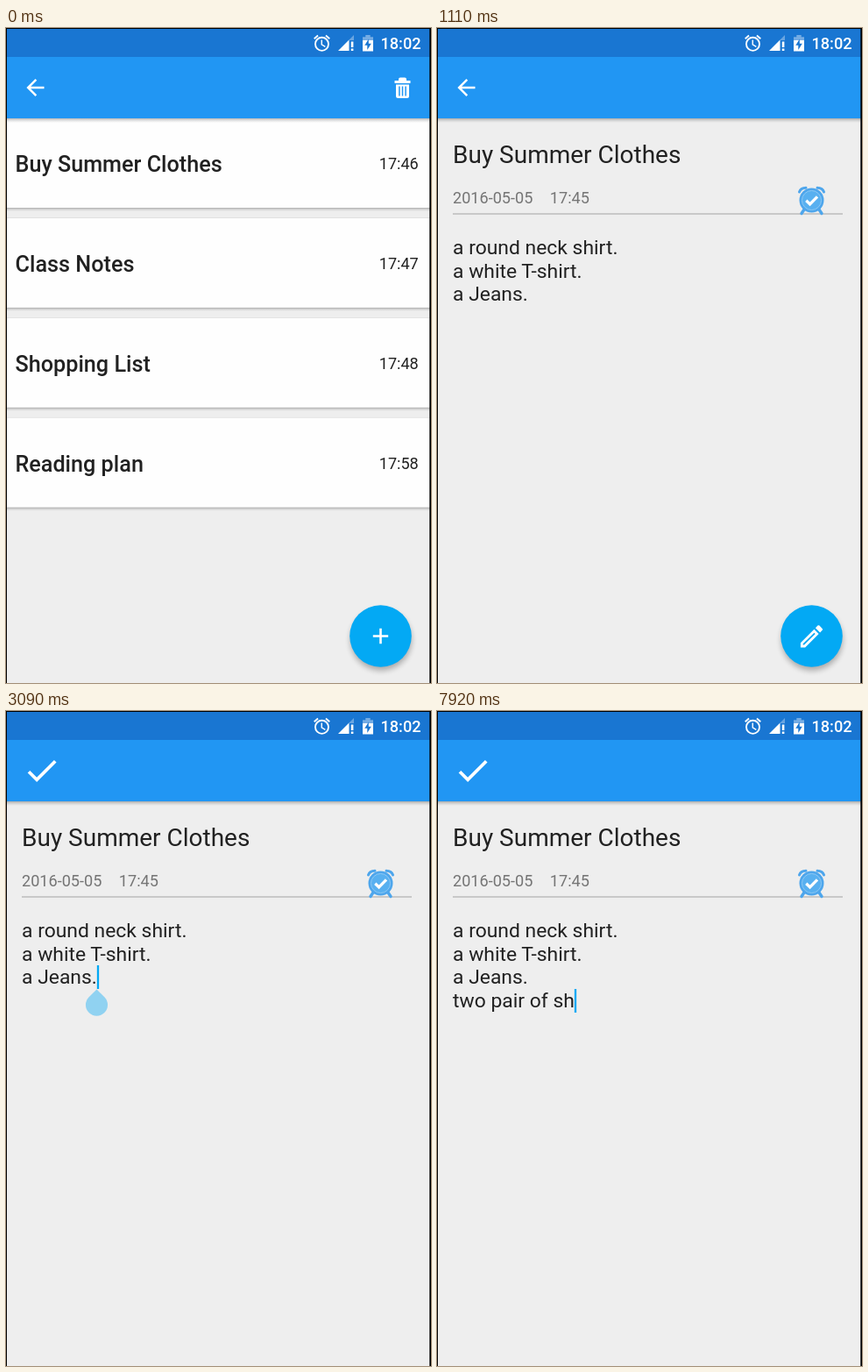
Animation of 485 by 747 pixels, one loop 8 s. Source, as an HTML page:

```html
<!DOCTYPE html>
<html lang="en">
<head>
<meta charset="utf-8">
<title>Notes</title>
<style>
  html, body { margin: 0; width: 100%; height: 100%; overflow: hidden; background: #000; }
  svg { display: block; width: 485px; height: 747px; }
  text { font-family: Roboto, sans-serif; fill: #212121; white-space: pre; }
  .item { font-size: 25.2px; font-weight: 500; }
  .small { font-size: 18.1px; }
  .grey { fill: #757575; }
  .title { font-size: 28px; }
  .body { font-size: 22.9px; }
  .clock { font-size: 18.2px; font-weight: 500; fill: #fff; }
</style>
</head>
<body>
<svg id="stage" viewBox="0 0 485 747" xmlns="http://www.w3.org/2000/svg"></svg>
<script>
const LOOP = 8000, STEP = 30;
const LEFT = 18, LINE = 26.5, BASE = 258, BLINK = 450;
const lines = ['a round neck shirt.', 'a white T-shirt.', 'a Jeans.'];
const typed = 'two pair of sh';
const keyTimes = [4470, 4800, 4890, 5370, 5640, 5760, 6150, 6330, 6660, 7200, 7290, 7500, 7830, 7920];
const items = [['Buy Summer Clothes', '17:46'], ['Class Notes', '17:47'],
               ['Shopping List', '17:48'], ['Reading plan', '17:58']];

const text = (x, y, cls, str, extra = '') => `<text x="${x}" y="${y}" class="${cls}" ${extra}>${str}</text>`;
const rect = (x, y, w, h, fill, extra = '') =>
  `<rect x="${x}" y="${y}" width="${w}" height="${h}" fill="${fill}" ${extra}/>`;
const icon = (x, y, scale, d) => `<path transform="translate(${x} ${y}) scale(${scale})" fill="#fff" d="${d}"/>`;

const backArrow = icon(18.4, 53, 1.255, 'M20 11H7.83l5.59-5.59L12 4l-8 8 8 8 1.41-1.41L7.83 13H20z');
const checkMark = icon(18.3, 45.5, 1.87, 'M9 16.17L4.83 12l-1.42 1.41L9 19 21 7l-1.41-1.41z');
const plus = '<path d="M418.8 693.5H436.2M427.5 684.8V702.2" stroke="#fff" stroke-width="2.6"/>';
const pencil = icon(410.7, 677, 1.4, 'M14.06 9.02l.92.92L5.92 19H5v-.92l9.06-9.06M17.66 3c-.25 0-.51.1-.7.29l-1.83 1.83 3.75 3.75 1.83-1.83c.39-.39.39-1.02 0-1.41l-2.34-2.34c-.2-.2-.45-.29-.71-.29zm-3.6 3.19L3 17.25V21h3.75L17.81 9.94l-3.75-3.75z');
const trash = `<g fill="#fff"><path d="M448 60V58.5Q448 56.5 450 56.5H455Q457 56.5 457 58.5V60H461.5V63H443.5V60Z"/>
  <path d="M445 64.5H460V77.5Q460 80 457.5 80H447.5Q445 80 445 77.5Z"/></g>
  <path d="M448.9 66.5V77.5M452.5 66.5V77.5M456.1 66.5V77.5" stroke="#2196f3" stroke-width="1.5"/>`;

const screen = (content, action) => rect(0, 0, 485, 800, '#eee') + content +
  rect(0, 103, 485, 5, 'url(#shade)') + rect(0, 0, 485, 33, '#1976d2') + rect(0, 33, 485, 70, '#2196f3') + action;

const fab = glyph => `<circle cx="428" cy="698" r="35" opacity=".28" filter="url(#blur)"/>
  <circle cx="427.5" cy="693.5" r="35.3" fill="#03a9f4"/>${glyph}`;

const card = ([name, time], i) => {
  const y = i * 113.9, top = i ? y + 103 : 103;
  return rect(0, top - .8, 485, 1, '#ddd') + rect(0, top, 485, y + 205 - top, '#fefefe') +
    rect(0, y + 205, 485, 4, 'url(#shade)') + text(10.5, y + 164, 'item', name) +
    text(470.8, y + 161, 'small', time, 'text-anchor="end"');
};

const reminder = `<g fill="none" stroke="#4ea6ec" stroke-linecap="round">
  <path d="M419 207L416 211.5M436 207L439 211.5" stroke-width="3.4"/>
  <path d="M413.5 187Q415 182.5 421 182.3M441.5 187Q440 182.5 434 182.3" stroke-width="3"/></g>
  <circle cx="427.5" cy="196.5" r="14" fill="#4ea6ec"/>
  <circle cx="427.5" cy="196.5" r="11" fill="#58b0f0" stroke="#8cc8f4"/>
  <path d="M421.3 196.8L425.6 201L434 192.4" fill="none" stroke="#fff" stroke-width="3.3"/>`;

const note = text(LEFT, 153.7, 'title', 'Buy Summer Clothes') +
  text(LEFT, 200.4, 'small grey', '2016-05-05') + text(128.8, 200.4, 'small grey', '17:45') +
  rect(LEFT, 211.3, 445, 1.4, '#b8b8b8') + reminder +
  lines.map((s, i) => text(LEFT, BASE + i * LINE, 'body', s)).join('');

const ripple = '<circle id="ripple" cx="430" cy="704" r="0" fill="#fff" opacity="0" clip-path="url(#fabClip)"/>';
const caretParts = text(LEFT, BASE + 3 * LINE, 'body', '', 'id="typing"') +
  rect(LEFT, 124, 2.3, 37, '#03a9f4', 'id="caret"') +
  '<path id="handle" fill="#03a9f4" d="M103.5 317.5l8.84 8.84a12.5 12.5 0 1 1-17.68 0z"/>';

const statusIcons = icon(349.2, 6.1, .94, 'M22 5.72l-4.6-3.86-1.29 1.53 4.6 3.86L22 5.72zM7.88 3.39L6.6 1.86 2 5.71l1.29 1.53 4.59-3.85zM12.5 8H11v6l4.75 2.85.75-1.23-4-2.37V8zM12 4a9 9 0 0 0 0 18a9 9 0 0 0 0-18zm0 16a7 7 0 0 1 0-14a7 7 0 0 1 0 14z') +
  `<g fill="#fff"><path d="M379 26L391.5 13.5V26Z"/><path d="M391.5 13.5L397 8V14H391.5Z" opacity=".35"/>
  <path d="M393.8 15.5H396.4V22H393.8ZM393.8 23.6H396.4V26H393.8Z"/>
  <path d="M407 14V10.2H410.3V8H415.7V10.2H419V14Z" opacity=".4"/><path d="M407 14H419V26.5H407Z"/></g>
  <path d="M413.8 12.5L409.3 19.8H412.3V25L416.8 17.8H413.8Z" fill="#1976d2"/>` +
  text(473.6, 24, 'clock', '18:02', 'text-anchor="end"');

document.getElementById('stage').innerHTML = `<defs>
  <linearGradient id="shade" x2="0" y2="1"><stop stop-opacity=".28"/><stop offset=".4" stop-opacity=".13"/><stop offset="1" stop-opacity="0"/></linearGradient>
  <filter id="blur" x="-30%" y="-30%" width="160%" height="160%"><feGaussianBlur stdDeviation="3"/></filter>
  <clipPath id="fabClip"><circle cx="427.5" cy="693.5" r="35.3"/></clipPath></defs>
  <g id="list">${screen(items.map(card).join(''), backArrow + trash + fab(plus))}</g>
  <rect id="listDim" width="485" height="747"/>
  <g id="view">${screen(note, backArrow + fab(pencil) + ripple)}</g>
  <rect id="viewDim" width="485" height="747"/>
  <g id="edit">${screen(note + caretParts, checkMark)}</g>
  ${statusIcons}
  <path d="M0 0H485V747H483.3V1H1V747H0Z"/>`;

const el = Object.fromEntries([...document.querySelectorAll('#stage [id]')].map(e => [e.id, e]));
const set = (node, attrs) => { for (const k in attrs) node.setAttribute(k, attrs[k]); };
const clamp = v => Math.max(0, Math.min(1, v));
const ctx = document.createElement('canvas').getContext('2d');
const widthOf = s => { ctx.font = '22.9px Roboto, sans-serif'; return ctx.measureText(s).width; };

// A new screen rises by 8% of the height while fading in over a dimming one.
function openScreen(group, dim, age, shown) {
  const left = 1 - clamp(age / 350);
  set(group, {
    visibility: shown ? 'visible' : 'hidden',
    opacity: 1 - (1 - clamp(age / 200)) ** 4,
    transform: `translate(0 ${Math.round(60 * left ** 5)})`
  });
  set(dim, { opacity: shown ? .2 * clamp(age / 217) : 0 });
}

function drawCaret(t) {
  const count = keyTimes.filter(k => k <= t).length;
  const str = typed.slice(0, count);
  el.typing.textContent = str;
  let since = 2250, x = LEFT, y = 124, height = 37;
  if (t >= 2940) { since = 2940; x += widthOf(lines[2]); y = 290; height = 27; }
  if (t >= 3600) { since = count ? keyTimes[count - 1] : 3600; x = LEFT + widthOf(str); y = 317; }
  set(el.caret, { x, y, height, opacity: t - since < BLINK ? 1 : 0 });
  const fadeIn = t < 3090 ? 0 : clamp((t - 3030) / 150);
  const fadeOut = clamp((t - 3570) / 210);
  set(el.handle, { opacity: fadeIn * (1 - fadeOut) });
}

function render(t) {
  openScreen(el.view, el.listDim, t - 885, t >= 930);
  openScreen(el.edit, el.viewDim, t - 2318, t >= 2340);
  const press = (t - 1860) / 180;
  set(el.ripple, { r: 14 + 16 * clamp(press), opacity: press >= 0 && press < 1 ? .1 * (1 - press) : 0 });
  drawCaret(t);
}

const start = performance.now();
function tick() {
  const t = (performance.now() - start) % LOOP;
  render(Math.floor(t / STEP) * STEP);
  requestAnimationFrame(tick);
}
tick();
</script>
</body>
</html>
```
